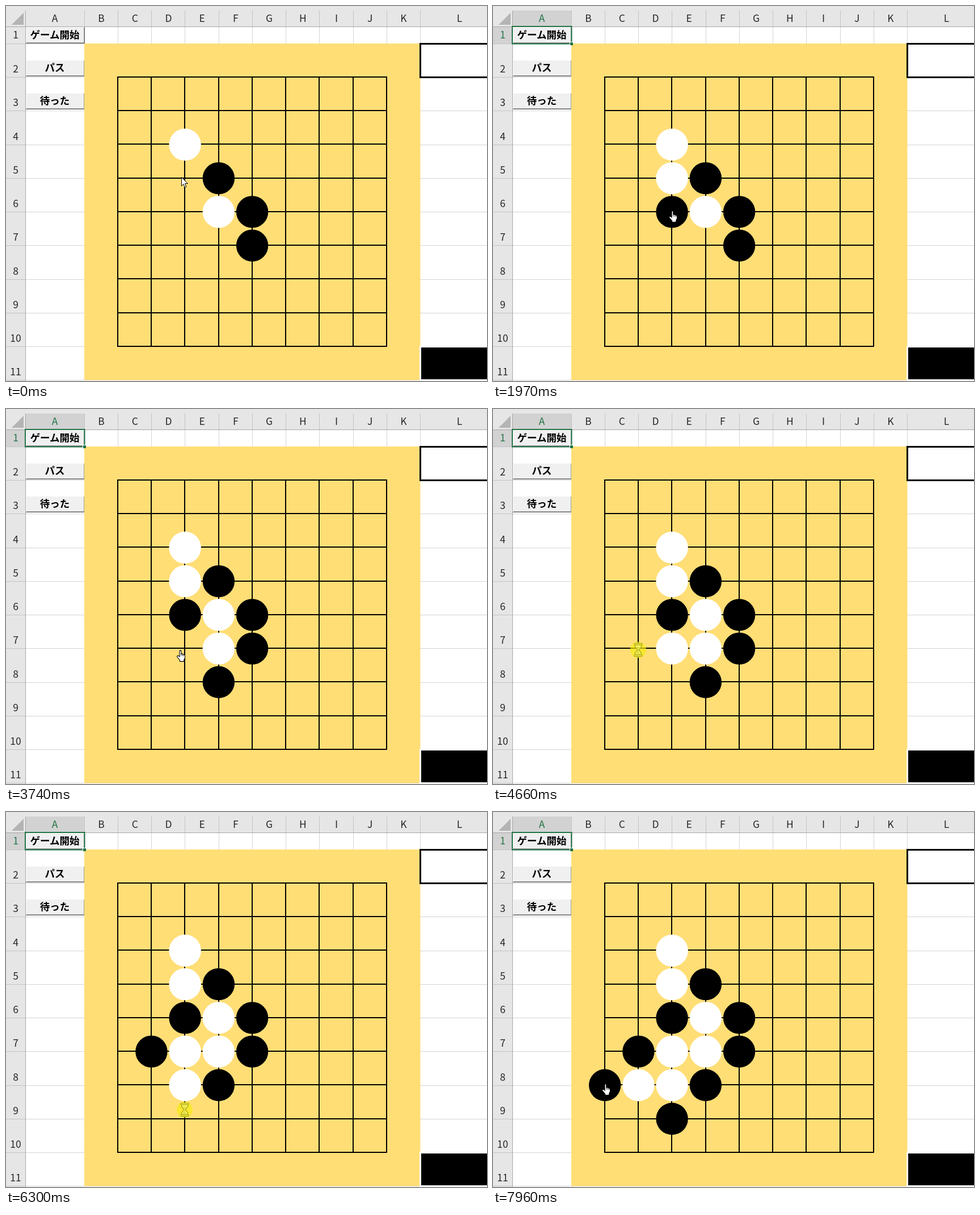
Write an HTML page that moves like this. It is 848x660 px and loops after 8 s.

```html
<!DOCTYPE html>
<html lang="ja">
<head>
<meta charset="utf-8">
<title>Board game on a sheet</title>
<style>
html, body { margin: 0; width: 100%; height: 100%; overflow: hidden; background: #fff; }
svg { display: block; width: 848px; height: 660px; }
text { font-family: "Noto Sans CJK JP", "Noto Sans CJK", "Noto Sans", sans-serif; text-anchor: middle; }
.head { font-size: 17.5px; fill: #262626; }
.btn { font-size: 17.5px; font-weight: 700; fill: #000; }
</style>
</head>
<body>
<svg id="stage" viewBox="0 0 848 660">
  <g id="sheet"></g>
  <g id="stones"></g>
  <g id="cursor">
    <path id="arrow" d="M.5 .5V15.8L4 12.4L6.3 18.4L8.9 17.3L6.6 11.5H11.4Z" fill="#fff" stroke="#000"/>
    <g id="hand" transform="translate(-7 0)">
      <path d="M5 11.5V2.2Q5 .6 6.4 .6Q7.8 .6 7.8 2.2V6.8Q9.2 6.2 10.2 7.4Q11.6 6.8 12.4 8.2Q14.5 8 14.5 10.2V14L12.8 17.4V20.4H5.6V18.2L1 12.8Q.1 10.8 1.6 10.2Q3.2 9.8 5 12Z" fill="#fff" stroke="#000" stroke-width="1.1"/>
      <path d="M7.8 7V10.5M10.2 7.6V10.8M12.4 8.4V11" fill="none" stroke="#000" stroke-width=".8"/>
    </g>
    <g id="wait">
      <path d="M-5.5 -9V-5.5L-1.2 0L-5.5 5.5V9H5.5V5.5L1.2 0L5.5 -5.5V-9Z" fill="#fff" stroke="#000" stroke-width="1.2"/>
      <path d="M-7 -11.5H7V-9H-7ZM-7 9H7V11.5H-7Z" fill="#fff" stroke="#000"/>
      <path d="M-3 -4.5H3M-1.5 -2.5H1.5M0 1V5M-2 5H2M-3.5 7H3.5" stroke="#000" stroke-dasharray="1 1"/>
      <circle r="14" fill="#f4ec10" opacity=".68"/>
    </g>
  </g>
</svg>
<script>
const LOOP = 8000, STEP = 59.22, X0 = 197, Y0 = 125.2;
const GREEN = "#217346", LINE = "#d4d4d4";
const $ = id => document.getElementById(id);

function add(parent, tag, attrs, text) {
  const el = document.createElementNS("http://www.w3.org/2000/svg", tag);
  for (const k in attrs) el.setAttribute(k, attrs[k]);
  if (text) el.textContent = text;
  parent.appendChild(el);
  return el;
}
const sheet = $("sheet");
const rect = (x, y, width, height, fill, parent = sheet) =>
  add(parent, "rect", { x, y, width, height, fill });
const label = (x, y, text, cls = "head") => add(sheet, "text", { x, y, class: cls }, text);
const colX = i => Math.round(X0 + (i - 2) * STEP);
const rowY = i => Math.round(Y0 + (i - 2) * STEP);

// Headers
rect(0, 0, 848, 36, "#e6e6e6");
rect(0, 36, 34, 624, "#e6e6e6");
const marks = [rect(35, 8, 103, 28, "#d2d2d2"), rect(0, 37, 34, 29, "#d2d2d2")];
add(sheet, "path", { d: "M31 12V33H10Z", fill: "#b4b4b4" });
const edges = [138];
for (let i = 2; i <= 11; i++) edges.push(colX(i));
edges.forEach(x => {
  rect(x, 8, 1, 28, "#c3c3c3");
  rect(x, 37, 1, 29, LINE);
});
for (let i = 1; i <= 11; i++) {
  const y = i < 2 ? 66 : rowY(i);
  rect(0, y, 34, 1, "#c3c3c3");
  rect(35, y, 813, 1, LINE);
}
rect(0, 36, 848, 1, "#a6a6a6");
rect(34, 8, 1, 652, "#a6a6a6");

const colA = label(86, 28, "A");
[..."BCDEFGHIJK"].forEach((c, i) => label(168 + i * STEP, 28, c));
label(799.5, 28, "L");
const row1 = label(17, 57, "1");
for (let i = 2; i <= 11; i++) label(17, rowY(i) - 8.5, String(i));

// Buttons
[["ゲーム開始", 37], ["パス", 95], ["待った", 153]].forEach(([text, y]) => {
  rect(35, y, 104, 29, "#696969");
  rect(35, y, 103, 28, "#fff");
  rect(36, y + 1, 102, 27, "#a0a0a0");
  rect(36, y + 1, 101, 26, "#f0f0f0");
  label(86, y + 20, text, "btn");
});

// Board
rect(138, 66, 592.5, 592.5, "#ffde76");
for (let i = 0; i < 9; i++) {
  const p = Math.round(i * STEP);
  rect(X0 - 1, 124 + p, 475.5, 2, "#000");
  rect(X0 - 1 + p, 124, 2, 475.5, "#000");
}
add(sheet, "rect", { x: 730.5, y: 66.5, width: 140, height: 59, fill: "#fff", stroke: "#000", "stroke-width": 3 });
add(sheet, "rect", { x: 730.5, y: 599.5, width: 140, height: 59, fill: "#000", stroke: "#fff", "stroke-width": 3 });

// Selected cell
const picked = add(sheet, "g", {});
add(picked, "rect", { x: 34, y: 36, width: 104.5, height: 30.5, fill: "none", stroke: GREEN, "stroke-width": 2 });
rect(135, 63, 6, 6, "#fff", picked);
rect(136, 64, 5, 5, GREEN, picked);

// Stones: column, row, black?
function stone(col, row, black) {
  return add($("stones"), "circle", {
    cx: X0 + 0.2 + col * STEP, cy: Y0 + 0.3 + row * STEP, r: 28.2, fill: black ? "#000" : "#fff"
  });
}
stone(2, 2, false);
stone(3, 3, true);
stone(3, 4, false);
stone(4, 4, true);
stone(4, 5, true);

// Turns: press time, landing time, column, row; white begins
const turns = [
  [980, 1110, 2, 3], [1830, 1970, 2, 4], [2630, 2760, 3, 5], [3190, 3320, 3, 6],
  [3920, 4050, 2, 5], [4660, 4790, 1, 5], [5480, 5600, 2, 6], [6300, 6430, 2, 7],
  [7050, 7160, 1, 6], [7830, 7960, 0, 6]
].map(([press, land, col, row], i) => ({ press, land, el: stone(col, row, i % 2 === 1) }));
const opening = { press: 180, land: 310 };

// Pointer moves: start, end, x, y
const moves = [
  [680, 840, 315, 303], [1470, 1770, 317, 360], [2140, 2450, 376, 420],
  [2800, 3050, 374, 468], [3400, 3740, 308, 424], [4340, 4470, 256, 424],
  [4860, 5220, 316, 468], [5700, 6250, 315, 524], [6680, 6930, 255, 480],
  [7550, 7770, 199, 478]
];

function pointer(t) {
  let x = 309, y = 301;
  for (const [a, b, tx, ty] of moves) {
    if (t < a) break;
    const p = Math.min(1, (t - a) / (b - a));
    const e = p * p * (3 - 2 * p);
    x += (tx - x) * e;
    y += (ty - y) * e;
  }
  return [Math.round(x), Math.round(y)];
}

const show = (el, on) => el.setAttribute("visibility", on ? "visible" : "hidden");

function draw(t) {
  const active = t >= 240;
  marks.forEach(el => show(el, active));
  show(picked, active);
  [colA, row1].forEach(el => { el.style.fill = active ? GREEN : ""; });
  turns.forEach(s => show(s.el, t >= s.land));

  const pressed = [opening, ...turns].some(s => t >= s.press && t < s.land);
  show($("arrow"), t < opening.press);
  show($("wait"), pressed);
  show($("hand"), !pressed && t >= opening.land);
  $("cursor").setAttribute("transform", `translate(${pointer(t)})`);
}

const start = performance.now();
function tick() {
  draw((performance.now() - start) % LOOP);
  requestAnimationFrame(tick);
}
tick();
</script>
</body>
</html>
```
